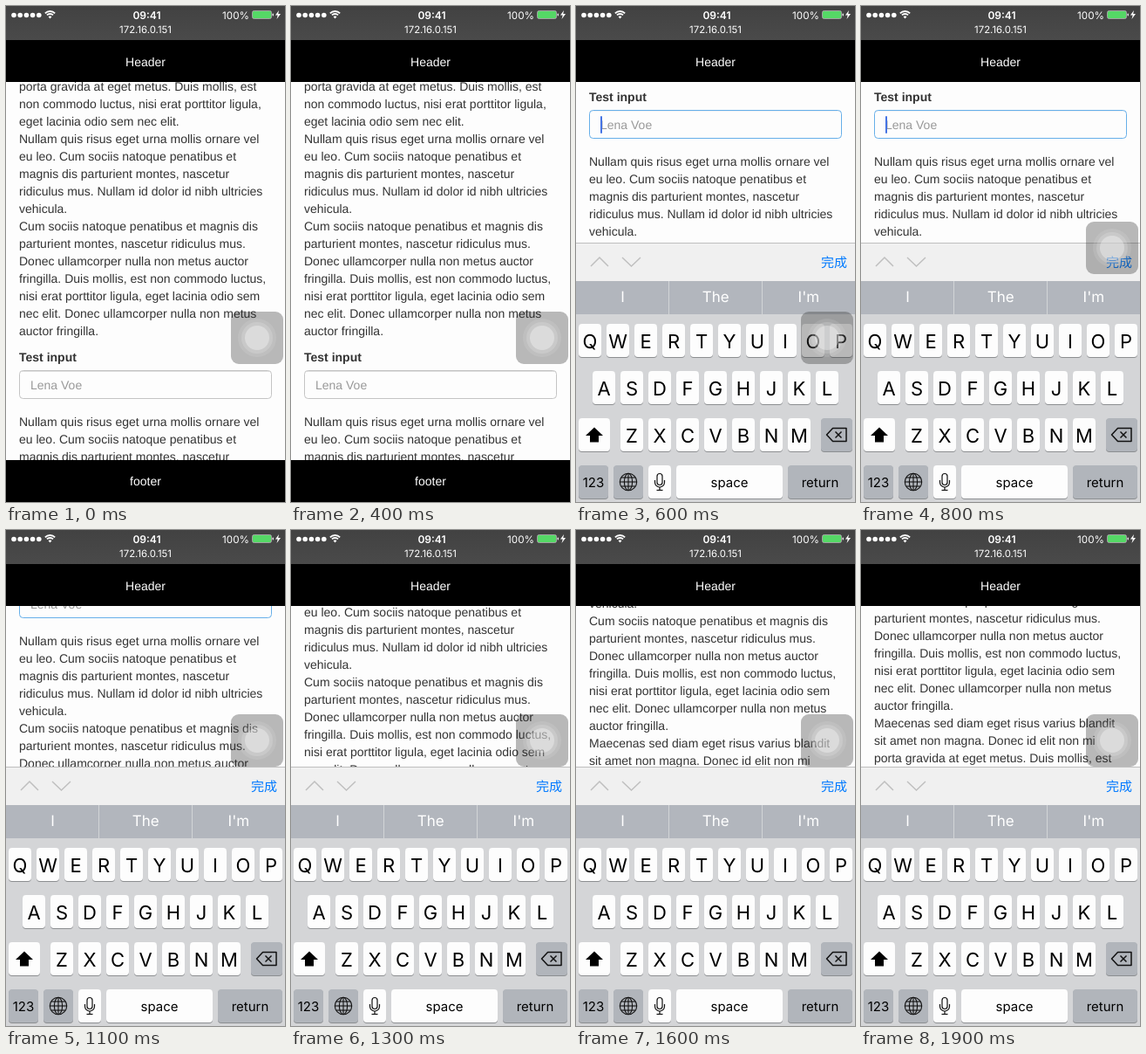
Write an HTML page with a canvas that moves like this. It is 320 px wide and 568 px high and loops after 2 s.

```html
<!DOCTYPE html>
<html lang="en">
<head>
<meta charset="utf-8">
<title>Fixed header with keyboard</title>
<style>
html, body { margin: 0; width: 100%; height: 100%; overflow: hidden; background: #fdfdfd; }
canvas { display: block; width: 320px; height: 568px; }
</style>
</head>
<body>
<canvas id="stage"></canvas>
<script>
const W = 320, H = 568, LOOP = 2000, TICK = 100;
const canvas = document.getElementById('stage');
const dpr = window.devicePixelRatio || 1;
canvas.width = W * dpr;
canvas.height = H * dpr;
const ctx = canvas.getContext('2d');
ctx.textRendering = 'geometricPrecision';

const BODY = '"Liberation Sans", Arial, sans-serif';
const UI = 'Inter, Roboto, sans-serif';

const nullam = [
  'Nullam quis risus eget urna mollis ornare vel',
  'eu leo. Cum sociis natoque penatibus et',
  'magnis dis parturient montes, nascetur',
  'ridiculus mus. Nullam id dolor id nibh ultricies',
  'vehicula.'
];
const sociis = [
  'Cum sociis natoque penatibus et magnis dis',
  'parturient montes, nascetur ridiculus mus.',
  'Donec ullamcorper nulla non metus auctor',
  'fringilla. Duis mollis, est non commodo luctus,',
  'nisi erat porttitor ligula, eget lacinia odio sem',
  'nec elit. Donec ullamcorper nulla non metus',
  'auctor fringilla.'
];
const maecenas = [
  'Maecenas sed diam eget risus varius blandit',
  'sit amet non magna. Donec id elit non mi',
  'porta gravida at eget metus. Duis mollis, est',
  'non commodo luctus, nisi erat porttitor ligula,',
  'eget lacinia odio sem nec elit.'
];
const before = [...maecenas, ...nullam, ...sociis];
const after = [...nullam, ...sociis, ...maecenas];

function text(str, x, y, font, color, align = 'left') {
  ctx.font = font;
  ctx.fillStyle = color;
  ctx.textAlign = align;
  ctx.fillText(str, x, y);
}

function rect(x, y, w, h, color) {
  ctx.fillStyle = color;
  ctx.fillRect(x, y, w, h);
}

function roundPath(x, y, w, h, r) {
  ctx.beginPath();
  ctx.roundRect(x, y, w, h, r);
}

function roundFill(x, y, w, h, r, color) {
  roundPath(x, y, w, h, r);
  ctx.fillStyle = color;
  ctx.fill();
}

function disc(x, y, r, color) {
  ctx.beginPath();
  ctx.arc(x, y, r, 0, Math.PI * 2);
  ctx.fillStyle = color;
  ctx.fill();
}

function trace(points, close) {
  ctx.beginPath();
  points.forEach(([x, y]) => ctx.lineTo(x, y));
  if (close) ctx.closePath();
}

function line(points, color, width, close) {
  trace(points, close);
  ctx.strokeStyle = color;
  ctx.lineWidth = width;
  ctx.stroke();
}

function shape(points, color) {
  trace(points, true);
  ctx.fillStyle = color;
  ctx.fill();
}

// Cubic Hermite through [time, value, slope] keys.
const scrollKeys = [[800, 0, 0], [1100, 51, 0.25], [1500, 154, 0.22], [1800, 196, 0.02], [1900, 197, 0]];

function scrollAt(t) {
  if (t <= scrollKeys[0][0]) return 0;
  for (let i = 1; i < scrollKeys.length; i++) {
    const [t0, v0, s0] = scrollKeys[i - 1], [t1, v1, s1] = scrollKeys[i];
    if (t > t1) continue;
    const d = t1 - t0, u = (t - t0) / d, w = 1 - u;
    return v0 * (1 + 2 * u) * w * w + s0 * d * u * w * w
      + v1 * u * u * (3 - 2 * u) - s1 * d * u * u * w;
  }
  return 197;
}

function drawInput(focused, caret) {
  roundPath(15.5, 417.5, 289, 32, 4);
  ctx.fillStyle = '#fdfdfd';
  ctx.fill();
  rect(18, 418, 284, 1, focused ? '#eef1f4' : '#dedede');
  roundPath(15.5, 417.5, 289, 32, 4);
  ctx.strokeStyle = focused ? '#66afe9' : '#c4c4c4';
  ctx.lineWidth = 1;
  ctx.stroke();
  text('Lena Voe', 28, 438.5, '14px ' + BODY, '#999');
  if (caret) roundFill(28, 424, 2, 20, 1, '#4573e3');
}

function drawPage(shift, focused, caret) {
  const font = '14px ' + BODY;
  const paragraph = (lines, y) => lines.forEach((s, i) => text(s, 15, y + i * 20, font, '#333'));
  ctx.save();
  ctx.translate(0, shift);
  paragraph(before, 377 - (before.length - 1) * 20);
  text('Test input', 15, 407, 'bold 14px ' + BODY, '#333');
  drawInput(focused, caret);
  paragraph(after, 481);
  ctx.restore();
}

function drawBand(y, label, baseline) {
  rect(0, y, W, 48, '#000');
  text(label, W / 2, y + baseline, '14px ' + BODY, '#fff', 'center');
}

function drawStatus() {
  const g = ctx.createLinearGradient(0, 0, 0, 39);
  g.addColorStop(0, '#424242');
  g.addColorStop(1, '#4a4a4a');
  rect(0, 0, W, 39, g);

  for (let i = 0; i < 5; i++) disc(9 + i * 7.2, 10.5, 2.8, '#fff');

  ctx.strokeStyle = '#fff';
  ctx.lineWidth = 1.8;
  for (const r of [8, 5]) {
    ctx.beginPath();
    ctx.arc(50.5, 14, r, -Math.PI * 0.75, -Math.PI * 0.25);
    ctx.stroke();
  }
  shape([[50.5, 14.5], [48.5, 12.2], [50.5, 11.3], [52.5, 12.2]], '#fff');

  text('09:41', 161.5, 14.5, '600 12px ' + UI, '#fff', 'center');
  text('100%', 279, 14.5, '11.7px ' + UI, '#fff', 'right');
  text('172.16.0.151', W / 2, 31, '11.4px ' + UI, '#fff', 'center');

  roundFill(283, 6, 21, 8, 1, '#55d866');
  roundPath(282.5, 5.5, 22, 9, 2);
  ctx.strokeStyle = 'rgba(255,255,255,0.5)';
  ctx.lineWidth = 1;
  ctx.stroke();
  roundFill(305.5, 8.5, 1.5, 3, 0.7, '#ddd');
  shape([[313, 5], [309, 10.5], [311.7, 10.5], [310.5, 15], [315, 9], [312.2, 9]], '#fff');
}

function drawKey(x, y, w, label, size = 22, dark = false) {
  roundFill(x, y + 1, w, 38, 4, '#8c8e91');
  roundFill(x, y, w, 38, 4, dark ? '#b1b5bb' : '#fdfdfd');
  if (label) text(label, x + w / 2, y + 19 + (size > 20 ? 9 : 5.5), size + 'px ' + UI, '#000', 'center');
}

function drawRow(letters, x, y) {
  [...letters].forEach((c, i) => drawKey(x + i * 32, y, 26, c));
}

function drawGlobe(x, y) {
  ctx.strokeStyle = '#111';
  ctx.lineWidth = 1.1;
  for (const rx of [9.7, 4.6]) {
    ctx.beginPath();
    ctx.ellipse(x, y, rx, 9.7, 0, 0, Math.PI * 2);
    ctx.stroke();
  }
  line([[x, y - 9.7], [x, y + 9.7]], '#111', 1.1);
  for (const [dy, half] of [[-5, 8.3], [0, 9.7], [5, 8.3]]) {
    line([[x - half, y + dy], [x + half, y + dy]], '#111', 1.1);
  }
}

function drawMic(x, y) {
  ctx.strokeStyle = '#111';
  ctx.lineWidth = 1.2;
  roundPath(x - 3, y - 9.5, 6, 13, 3);
  ctx.stroke();
  ctx.beginPath();
  ctx.moveTo(x - 5.5, y - 2);
  ctx.lineTo(x - 5.5, y + 0.5);
  ctx.arc(x, y + 0.5, 5.5, Math.PI, 0, true);
  ctx.lineTo(x + 5.5, y - 2);
  ctx.stroke();
  line([[x, y + 6], [x, y + 9.5]], '#111', 1.2);
  line([[x - 3.5, y + 9.5], [x + 3.5, y + 9.5]], '#111', 1.2);
}

function drawKeyboard(drop) {
  ctx.save();
  ctx.translate(0, drop);

  rect(0, 271, W, 44, '#f0f0f0');
  rect(0, 271, W, 1, '#bfbfbf');
  line([[17, 298], [27, 288], [37, 298]], '#bfbfbf', 1.5);
  line([[53, 288], [63.5, 298], [74, 288]], '#bfbfbf', 1.5);
  text('完成', 281, 298.5, '500 15px "Noto Sans CJK SC", "Noto Sans CJK", sans-serif', '#007aff');

  rect(0, 315, W, 38, '#b2b6bd');
  ['I', 'The', "I'm"].forEach((s, i) => {
    text(s, 53.5 + i * 106.7, 338.5, '17px ' + UI, '#fff', 'center');
    if (i) rect(i * 107 - 1, 315, 1, 38, '#d2d4d7');
  });

  rect(0, 353, W, 215, '#d4d5d7');
  drawRow('QWERTYUIOP', 3, 364);
  drawRow('ASDFGHJKL', 19, 418);
  drawRow('ZXCVBNM', 51, 472);

  drawKey(3, 472, 36);
  shape([[21, 482.5], [31, 492], [26, 492], [26, 499.5], [16, 499.5], [16, 492], [11, 492]], '#000');

  drawKey(281, 472, 36, '', 15, true);
  ctx.lineJoin = 'round';
  line([[287.5, 491], [294.5, 483.5], [310, 483.5], [310, 498.5], [294.5, 498.5]], '#111', 1.5, true);
  line([[297.5, 487.5], [304.5, 494.5]], '#111', 1.5);
  line([[304.5, 487.5], [297.5, 494.5]], '#111', 1.5);

  drawKey(3, 526, 34, '123', 15, true);
  drawKey(43, 526, 34, '', 15, true);
  drawGlobe(60, 545);
  drawKey(83, 526, 26);
  drawMic(96, 545);
  drawKey(115, 526, 122, 'space', 15);
  drawKey(243, 526, 74, 'return', 15, true);
  ctx.restore();
}

function drawTouchButton(y) {
  roundFill(258, y, 60, 60, 9, 'rgba(40,40,40,0.32)');
  disc(288, y + 30, 22, 'rgba(255,255,255,0.1)');
  disc(288, y + 30, 18, 'rgba(255,255,255,0.16)');
  disc(288, y + 30, 14, 'rgba(255,255,255,0.34)');
}

function buttonY(t) {
  const u = Math.min(1, Math.max(0, (t - 600) / 300));
  return 350 - 139 * u * u * (3 - 2 * u);
}

function draw(t) {
  const typing = t >= 500;
  const rising = typing && t < 600;
  const caret = t % 1000 >= 500;
  const nudge = rising ? 22 : 0;
  const shift = typing ? nudge - 298 - Math.round(scrollAt(t)) : 0;

  ctx.setTransform(dpr, 0, 0, dpr, 0, 0);
  rect(0, 0, W, H, '#fdfdfd');
  drawPage(shift, typing, caret);
  drawBand(39 + nudge, 'Header', 30);
  if (typing) drawKeyboard(rising ? 34 : 0);
  else drawBand(520, 'footer', 29);
  drawStatus();
  drawTouchButton(Math.round(buttonY(t)));
}

const start = performance.now();
function loop() {
  const t = (performance.now() - start) % LOOP;
  draw(Math.floor(t / TICK) * TICK);
  requestAnimationFrame(loop);
}
loop();
</script>
</body>
</html>
```
